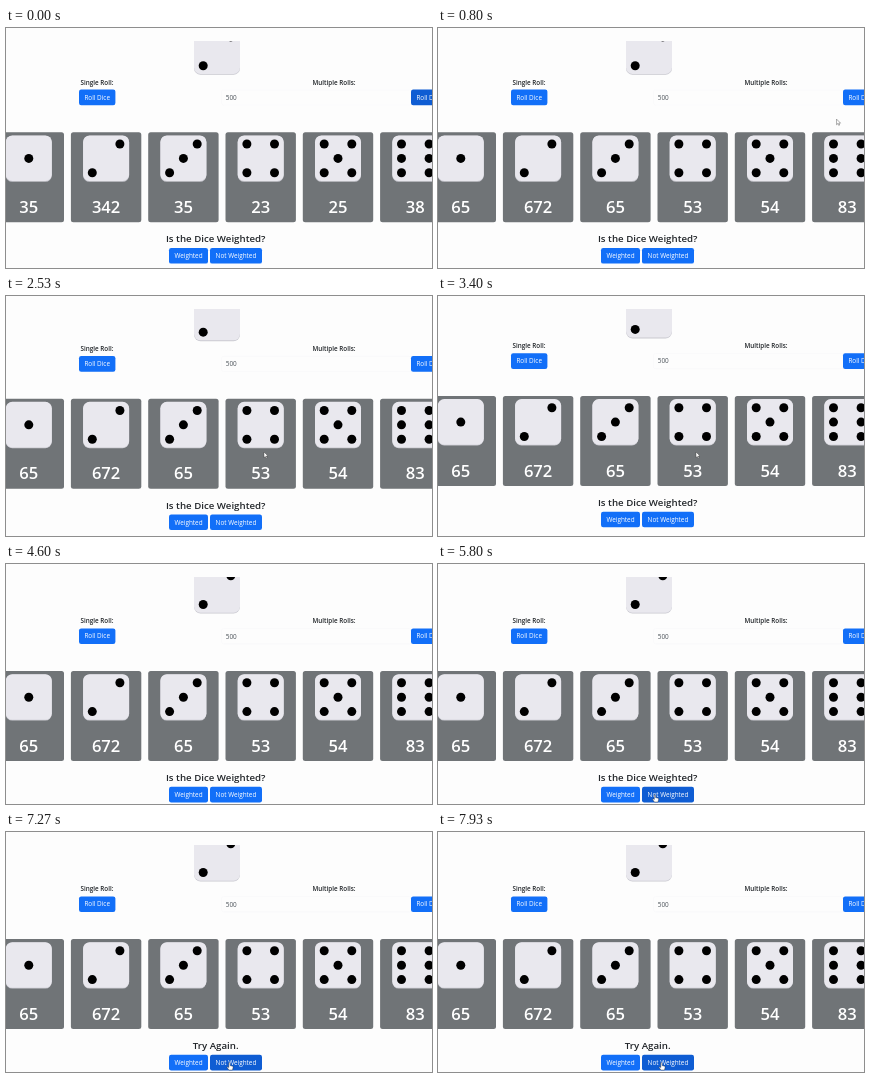
Recreate the animation shown at these times as an HTML page. Size 426 by 240 pixels, loop 8 s.

```html
<!DOCTYPE html>
<html lang="en">
<head>
<meta charset="utf-8">
<title>Dice rolls</title>
<style>
  html, body { margin: 0; width: 100%; height: 100%; overflow: hidden; background: #fdfdfd; }
  svg { display: block; width: 100vw; height: 100vh; }
  text { font-family: "Open Sans", "Noto Sans", sans-serif; text-anchor: middle; fill: #212529; }
  .bold { font-weight: 600; font-size: 6.3px; }
  .title { font-weight: 600; font-size: 9.7px; }
  .btn { font-size: 6.4px; fill: #fff; }
  .count { font-size: 16.6px; font-weight: 600; fill: #fff; }
</style>
</head>
<body>
<svg viewBox="0 0 426 240">
  <defs><clipPath id="view"><rect y="13" width="426" height="227"/></clipPath></defs>
  <g clip-path="url(#view)"><g id="page"></g></g>
  <path id="arrow" d="M0 0V5.6L1.3 4.4L2.2 6.3L3.1 5.9L2.2 4H4Z" fill="#fff" stroke="#333" stroke-width=".4"/>
  <path id="hand" d="M-.7 0Q0 -.8 .6 0V2.6L3.2 3.2Q3.8 3.5 3.6 4.4L3 7H-.6L-2.4 4.5Q-2.4 3.6 -1.5 3.9L-.7 4.5Z" fill="#fff" stroke="#222" stroke-width=".4"/>
</svg>
<script>
const LOOP = 8000;
const BLUE = '#126ff8', DARK = '#0f5dd3';
const BEFORE = [35, 342, 35, 23, 25, 38];
const AFTER = [65, 672, 65, 53, 54, 83];
const ROLL_AT = 400, ANSWER_AT = 7250;

// [time, value...] stops; eased between neighbours
const SCROLL = [[0, 0], [2450, 0], [2650, -4.3], [3850, -4.3], [4100, 2.8]];
const MOUSE = [[0, 440, 72], [600, 440, 72], [1250, 258, 156], [3850, 258, 156],
  [4300, 240, 250], [5100, 240, 250], [5500, 217, 231], [6000, 217, 231], [6400, 223.5, 231]];

const $ = id => document.getElementById(id);
const page = $('page');

function add(tag, attrs, text) {
  const el = document.createElementNS('http://www.w3.org/2000/svg', tag);
  for (const k in attrs) el.setAttribute(k, attrs[k]);
  if (text !== undefined) el.textContent = text;
  return page.appendChild(el);
}

const label = (x, y, cls, text) => add('text', { x, y, class: cls }, text);

function button(x, y, width, text) {
  const box = add('rect', { x, y, width, height: 15.6, rx: 2.2, fill: BLUE });
  label(x + width / 2, y + 10.1, 'btn', text);
  return box;
}

function die(cx, cy, n) {
  add('rect', { x: cx - 23, y: cy - 22.6, width: 46, height: 46, rx: 6.5, fill: '#c9c9d0' });
  add('rect', { x: cx - 23, y: cy - 23, width: 46, height: 45.6, rx: 6.5, fill: '#e9e8ee' });
  const spots = [];
  if (n % 2) spots.push([0, 0]);
  if (n > 1) spots.push([1, -1], [-1, 1]);
  if (n > 3) spots.push([-1, -1], [1, 1]);
  if (n === 6) spots.push([-1, 0], [1, 0]);
  for (const [x, y] of spots)
    add('circle', { cx: cx + x * 13.8, cy: cy + y * 14.4, r: 4.5, fill: '#000' });
}

die(211, 23.3, 2);
label(91, 56.7, 'bold', 'Single Roll:');
label(328, 56.7, 'bold', 'Multiple Rolls:');
button(73, 61.6, 36.4, 'Roll Dice');
add('rect', { x: 215.5, y: 61.8, width: 190, height: 15.2, rx: 2, fill: '#fdfdfd', stroke: '#f6f6f8', 'stroke-width': .5 });
label(225.3, 71.8, '', '500').setAttribute('style', 'font-size:6.4px;fill:#495057');
const multi = button(405, 61.6, 36.4, 'Roll Dice');

const counts = BEFORE.map((n, i) => {
  const cx = 22.8 + i * 77.3;
  add('rect', { x: cx - 35.2, y: 104.2, width: 70.4, height: 90, rx: 2.5, fill: '#707477' });
  die(cx, 130.4, i + 1);
  return label(cx, 185, 'count', n);
});

const title = label(209.7, 214.4, 'title', '');
button(163, 220, 39, 'Weighted');
const not = button(204, 220, 52, 'Not Weighted');

function track(stops, t) {
  let i = stops.length - 1;
  while (i > 0 && stops[i][0] > t) i--;
  const a = stops[i], b = stops[i + 1];
  if (!b) return a.slice(1);
  const p = (t - a[0]) / (b[0] - a[0]), e = p * p * (3 - 2 * p);
  return a.slice(1).map((v, k) => v + (b[k + 1] - v) * e);
}

function draw(t) {
  const [dy] = track(SCROLL, t);
  const [mx, my] = track(MOUSE, t);
  page.setAttribute('transform', `translate(0 ${dy})`);

  const values = t < ROLL_AT ? BEFORE : AFTER;
  counts.forEach((el, i) => el.textContent = values[i]);
  title.textContent = t < ANSWER_AT ? 'Is the Dice Weighted?' : 'Try Again.';

  const overNot = mx > 204 && mx < 256 && my > 220 + dy && my < 235.6 + dy;
  const overMulti = mx > 405 && my < 77.2 + dy;
  not.setAttribute('fill', overNot ? DARK : BLUE);
  multi.setAttribute('fill', overMulti ? DARK : BLUE);

  for (const [id, on] of [['arrow', !overNot], ['hand', overNot]]) {
    $(id).setAttribute('transform', `translate(${mx} ${my})`);
    $(id).setAttribute('visibility', on ? 'visible' : 'hidden');
  }
}

const start = performance.now();
function tick(now) {
  draw(Math.max(0, now - start) % LOOP);
  requestAnimationFrame(tick);
}
draw(0);
requestAnimationFrame(tick);
</script>
</body>
</html>
```
